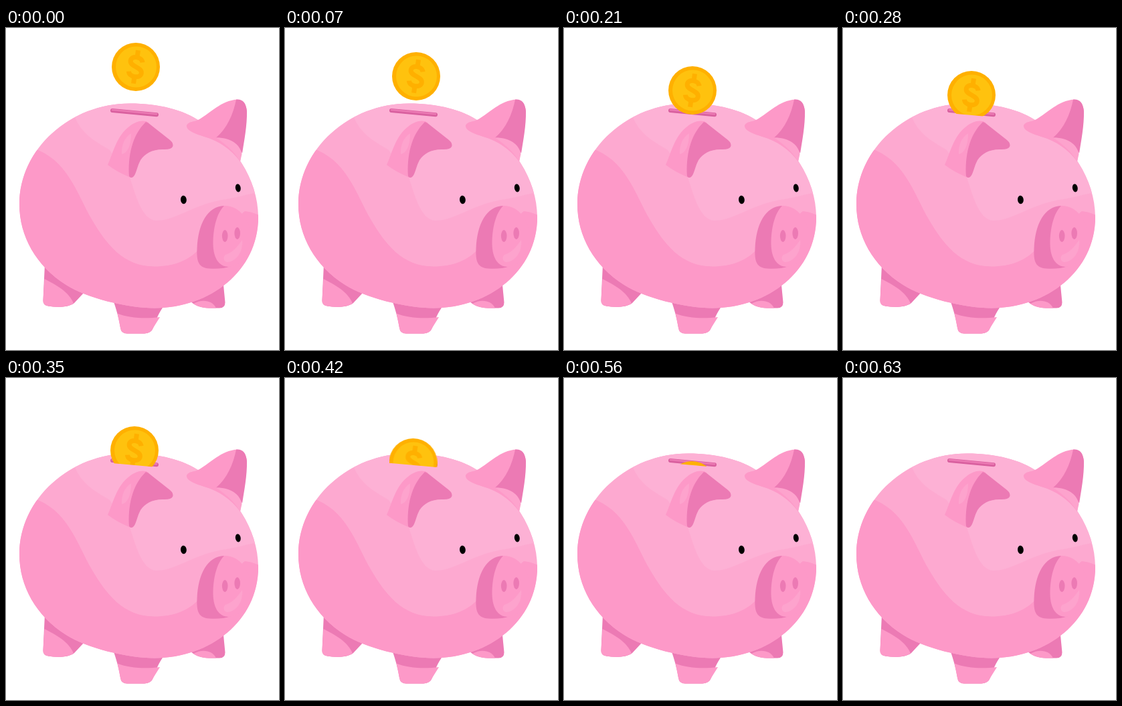
An HTML page for the animation above (770 ms loop, 408 by 480 pixels).

```html
<!DOCTYPE html>
<html lang="en">
<head>
<meta charset="utf-8">
<title>Piggy bank</title>
<style>
  html, body { margin: 0; width: 100%; height: 100%; overflow: hidden; background: #fff; }
  svg { display: block; width: 408px; height: 480px; }
  .pink { fill: #fd99c8; }
  .soft { fill: #fda9d0; }
  .pale { fill: #fdb1d5; }
  .deep { fill: #ec7ab4; }
  .glow { fill: #fda3cd; }
  .coin { animation: drop 770ms step-end infinite; }

  /* falls, slows at the slot, then slips inside */
  @keyframes drop {
    0%       { transform: translate(194px, 58px); }
    9.0909%  { transform: translate(196px, 72px); }
    18.1818% { transform: translate(192px, 85px); }
    27.2727% { transform: translate(192px, 93px); }
    36.3636% { transform: translate(192px, 100px); }
    45.4545% { transform: translate(192px, 108px); }
    54.5454% { transform: translate(191.5px, 126px); }
    63.6363% { transform: translate(191px, 145px); }
    72.7272% { transform: translate(191px, 160px); }
    81.8181%, 100% { transform: translate(191px, 180px); }
  }
</style>
</head>
<body>
<svg viewBox="0 0 408 480">
  <defs>
    <path id="shape" d="M20 263C20 180 96 112.500 185 112.500C229 112.500 265 122 290 139C340 172 377 225 377 282C377 362 305 417.500 222 417.500C180 417.500 120 402 90 383C45 355 20 310 20 263Z"/>
    <clipPath id="body"><use href="#shape"/></clipPath>
    <clipPath id="above"><path d="M0 0H408V133H226L159 127H0Z"/></clipPath>
  </defs>

  <g id="legs">
    <path class="deep" d="M58 352L55.500 406Q55 413 63 414.500C78 417 95 416 102 410L116 395Z"/>
    <path class="pink" d="M57.500 374C75 383 94 393 101 410.500C93 416 78 417 63 414.500Q55 413 55.500 406Z"/>
    <path class="deep" d="M160 405C165 420 169 433 171 447Q172 455.500 181 455.500H207Q217 455 220 447C224 436 228 424 237 413Z"/>
    <path class="pink" d="M166.500 425.500C185 433 210 433.500 230 431L220 447Q217 455 207 455.500H181Q172 455.500 171 447Z"/>
    <path class="deep" d="M274 406L325 383L327.500 409Q327.500 417.500 319 417.500H303C290 417 281 413 274 406Z"/>
    <path class="pink" d="M280 411C292 404 308 405 314 417.500H303C292 417 286 415 280 411Z"/>
  </g>

  <use href="#shape" class="soft"/>
  <g clip-path="url(#body)">
    <path class="pale" d="M102 130C112 160 140 172 155 182L185 222C195 255 205 287 225 287C255 287 280 262 330 255C350 252 362 247 380 245V100H102Z"/>
    <path class="pink" d="M40 179C92 196 105 245 128 285C150 322 175 355.500 222 355.500C250 355.500 272 347 287 331L357 273Q368 274 380 280L400 440H0V179Z"/>
  </g>

  <g id="ears">
    <path class="pink" d="M270 145C273 139 281 140 287 137C303 129 318 111 341 107C353 105 359 112 360 124L350 199C336 181 320 169 296 162C280 157 269 152 270 145Z"/>
    <path class="deep" d="M344 106.500C354 105.500 359 112 360 124C360.500 145 356 168 353 187C346 171 332 164 314 163.500C330 150 340 128 344 106.500Z"/>
    <path class="glow" d="M314 163.500C335 163 350 173 352.500 188L350 199C340 183 328 173 314 163.500Z"/>
    <path class="pink" d="M152 204C160 187 165 161 184 147C194 139 205 136 213 141L190 222Q187 224 184 222Q165 214 152 204Z"/>
    <path class="glow" d="M187 157C177 163 172 176 173 188C183 186 187 172 187 157Z"/>
    <path class="deep" d="M209 140Q213 141 217 145L245 167Q251 172 249 177Q247 181 237 181C220 180 207 187 201 197C196 206 195 216 191 221Q187 225 184 221C182 192 188 160 209 140Z"/>
  </g>

  <g id="face">
    <ellipse cx="265.400" cy="256" rx="4.400" ry="6.200" transform="rotate(-6 265.400 256)"/>
    <ellipse cx="346.800" cy="238.500" rx="3.900" ry="6" transform="rotate(-10 346.800 238.500)"/>
    <path class="deep" d="M326 265C301 266 287 292 285.500 329C284.500 350 289 357 303 358.500Q322 360 336 355L345 290Z"/>
    <path class="pink" d="M326 265C348 264 365 286 365 309C365 336 350 356 333 356C317 356 309 341 309.500 318C310 295 316 275 326 265Z"/>
    <path class="glow" d="M353 316C355 333 344 349 330 349C325 348 324 341 328 338C337 335 344 329 353 316Z"/>
    <g class="deep">
      <ellipse cx="327.200" cy="310" rx="4.300" ry="9"/>
      <ellipse cx="345.700" cy="306" rx="4.300" ry="9"/>
    </g>
  </g>

  <g id="slot" fill="none" stroke-linecap="round">
    <path d="M159 123L225 129.200" stroke="#d9609f" stroke-width="6"/>
    <path d="M159 122L225 128.200" stroke="#ec7ab4" stroke-width="2.500"/>
  </g>

  <g clip-path="url(#above)">
    <g class="coin">
      <circle r="36" fill="#ffb000"/>
      <circle cx=".5" r="30.500" fill="#ffc20e"/>
      <g transform="rotate(8)" fill="none" stroke="#ffb000" stroke-width="7">
        <path d="M9 -8C7 -16 -9 -17 -9 -8C-9 1 9.500 -1 9.500 8C9.500 17 -8 17 -9.500 8"/>
        <path d="M0 -25V-14M0 14V25"/>
      </g>
    </g>
  </g>
</svg>
</body>
</html>
```
